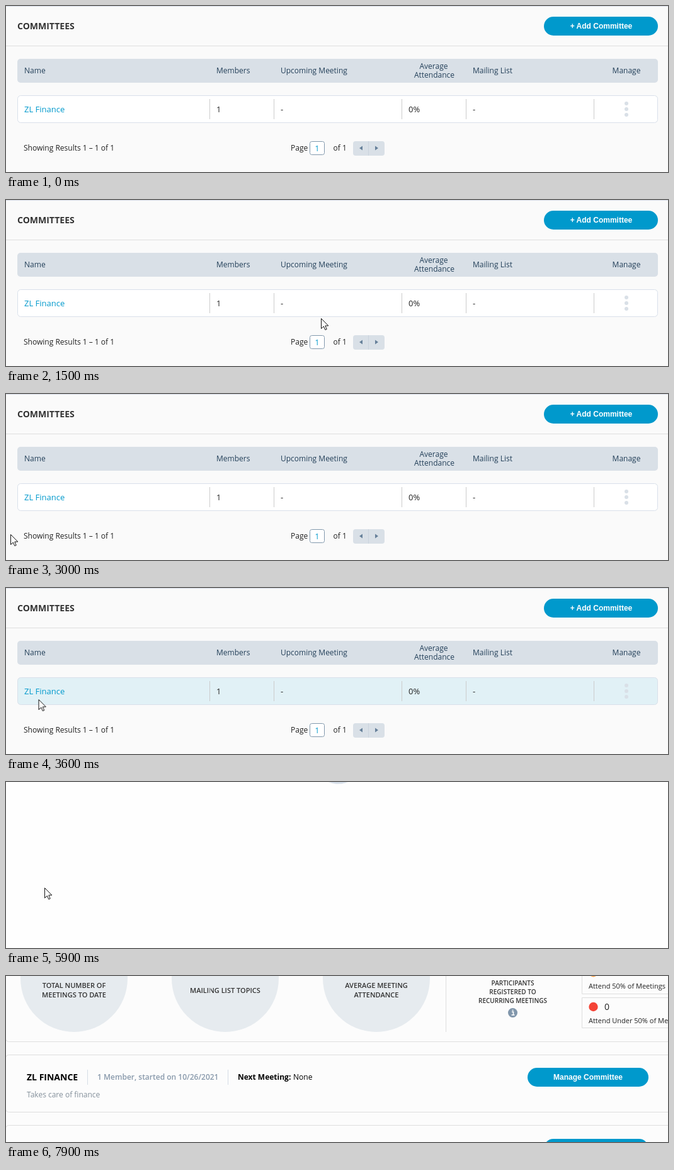
An HTML page that plays this animation: 1051 by 264 pixels, repeating every 8 s.

```html
<!DOCTYPE html>
<html lang="en">
<head>
<meta charset="utf-8">
<title>Committees</title>
<style>
html, body { margin: 0; width: 100%; height: 100%; overflow: hidden; background: #fefefe; }
svg { display: block; width: 1051px; height: 264px; font: 12px "Open Sans", sans-serif; }
.list, .detail, .wait, .row, .add, .mouse, .arrow, .beam { animation: 8s step-end infinite; }
.list { animation-name: list; }
.wait { animation-name: wait; }
.detail { animation-name: detail; }
.row { fill: #fff; stroke: #d9e0ea; animation-name: row; }
.add { animation-name: add; }
.mouse { animation-name: mouse; }
.arrow { fill: #fff; stroke: #111; animation-name: arrow; }
.beam { animation-name: beam1; }
.beam.b { animation-name: beam2; }
.spin { transform-origin: 527.5px -37px; animation: spin .8s steps(8) infinite; }

.mid { text-anchor: middle; }
.b { font-weight: 700; }
.semi { font-weight: 600; }
.head { fill: #24405a; }
.dark { fill: #222; }
.blue { fill: #0099cc; }
.bar { fill: #d9e0e7; }
.line { fill: none; stroke: #dedede; }
.btn { font: bold 12px "Liberation Sans", Arial, sans-serif; fill: #fff; text-anchor: middle; }

@keyframes list { 0% { opacity: 1 } 52.5%, 100% { opacity: 0 } }
@keyframes wait { 0% { opacity: 0 } 52.5% { opacity: 1 } 78.75%, 100% { opacity: 0 } }
@keyframes detail { 0% { opacity: 0 } 78.75%, 100% { opacity: 1 } }
@keyframes row {
  0%, 18.75%, 23.75%, 37.5%, 100% { fill: #fff }
  7.5%, 21.25%, 36.25%, 43.75% { fill: #e1f1f6 }
  33.75% { fill: #fff }
}
@keyframes add { 0%, 32.5%, 100% { fill: #0099cc } 30% { fill: #0087b4 } }
@keyframes spin { from { transform: rotate(72deg) } to { transform: rotate(432deg) } }
@keyframes arrow {
  0%, 95%, 98.75%, 100% { opacity: 0 }
  3.75%, 97.5% { opacity: 1 }
}
@keyframes beam1 { 0% { opacity: 0 } 95% { opacity: 1 } 97.5%, 100% { opacity: 0 } }
@keyframes beam2 { 0% { opacity: 0 } 98.75%, 100% { opacity: 1 } }
@keyframes mouse {
  0% { transform: translate(95px, 0) }
  3.75% { transform: translate(95px, 0); animation-timing-function: steps(3) }
  7.5% { transform: translate(75px, 160px) }
  8.75% { transform: translate(64px, 187px) }
  10% { transform: translate(60px, 179px); animation-timing-function: steps(3) }
  13.75% { transform: translate(27px, 163px) }
  16.25% { transform: translate(264px, 173px) }
  18.75% { transform: translate(500px, 188px) }
  21.25% { transform: translate(640px, 172px); animation-timing-function: steps(6) }
  28.75% { transform: translate(900px, 54px); animation-timing-function: steps(2) }
  31.25% { transform: translate(905px, 36px) }
  32.5% { transform: translate(830px, 62px) }
  33.75% { transform: translate(756px, 77px) }
  36.25% { transform: translate(300px, 160px) }
  37.5% { transform: translate(7px, 223px) }
  38.75% { transform: translate(4px, 222px); animation-timing-function: steps(6) }
  46.25% { transform: translate(61px, 168px) }
  92.5% { transform: translate(90px, 180px) }
  93.75% { transform: translate(170px, 197px) }
  97.5%, 100% { transform: translate(280px, 85px) }
}
</style>
</head>
<body>
<svg viewBox="0 0 1051 264">
  <g class="list">
    <rect width="1051" height="264" fill="#fafafa"/>
    <path d="M0 .5H1051" stroke="#d9dfea"/>
    <path class="line" d="M0 63.5H1051"/>
    <text class="b" x="18" y="37" font-size="14" fill="#333">COMMITTEES</text>
    <rect class="add" x="854" y="17" width="181" height="30" rx="15"/>
    <text class="btn" x="945" y="36">+ Add Committee</text>

    <rect class="bar" x="18" y="84" width="1017" height="38" rx="5"/>
    <g class="head">
      <text x="29" y="107">Name</text>
      <text x="334" y="107">Members</text>
      <text x="436" y="107">Upcoming Meeting</text>
      <text class="mid" x="679" y="100">Average</text>
      <text class="mid" x="680" y="114">Attendance</text>
      <text x="741" y="107">Mailing List</text>
      <text class="mid" x="985" y="107">Manage</text>
    </g>

    <rect class="row" x="18.5" y="142.5" width="1016" height="43" rx="5"/>
    <path d="M323.5 148v32m102-32v32m203-32v32m102-32v32m203-32v32" stroke="#ccc"/>
    <g class="dark" font-size="13">
      <text class="blue" x="29" y="169">ZL Finance</text>
      <text x="334" y="169">1</text>
      <text x="436" y="169">-</text>
      <text x="639" y="169">0%</text>
      <text x="741" y="169">-</text>
    </g>
    <g class="bar">
      <circle cx="985" cy="155" r="3"/>
      <circle cx="985" cy="164" r="3"/>
      <circle cx="985" cy="173" r="3"/>
    </g>

    <g class="dark">
      <text x="28" y="230">Showing Results 1 – 1 of 1</text>
      <text x="452" y="230">Page</text>
      <text x="519.5" y="230">of 1</text>
    </g>
    <rect x="482.5" y="215.5" width="23" height="21" rx="3" fill="#fff" stroke="#8299ad"/>
    <text class="mid blue" x="494" y="231">1</text>
    <rect class="bar" x="551" y="215" width="50" height="23" rx="4"/>
    <path d="M575.5 215v23" stroke="#cbd4dd"/>
    <path d="M566 222.500v7l-5-3.500zM586 222.500v7l5-3.500z" fill="#66809a"/>
  </g>

  <g class="wait">
    <rect width="1051" height="264" fill="#fefefe"/>
    <circle class="spin" cx="527.5" cy="-37" r="36" fill="none" stroke="#d5dee9"
            stroke-width="8" pathLength="360" stroke-dasharray="270 90"/>
  </g>

  <g class="detail">
    <rect width="1051" height="264" fill="#fcfcfc"/>
    <g fill="#e6ebef">
      <circle cx="108" cy="4" r="85"/>
      <circle cx="348" cy="4" r="85"/>
      <circle cx="588" cy="4" r="85"/>
    </g>
    <g class="mid semi" font-size="11" fill="#333">
      <text x="108" y="19">TOTAL NUMBER OF</text>
      <text x="108" y="34">MEETINGS TO DATE</text>
      <text x="348" y="27">MAILING LIST TOPICS</text>
      <text x="588" y="19">AVERAGE MEETING</text>
      <text x="588" y="34">ATTENDANCE</text>
    </g>
    <g class="mid semi" font-size="10" fill="#333">
      <text x="804.5" y="15">PARTICIPANTS</text>
      <text x="804.5" y="29">REGISTERED TO</text>
      <text x="804.5" y="43">RECURRING MEETINGS</text>
    </g>
    <circle cx="804.5" cy="58.500" r="7.500" fill="#8096ab"/>
    <path d="M803 57h2.500v5m-3 0h5M803.500 54.500h2" fill="none" stroke="#fff" stroke-width="1.600"/>

    <g class="line">
      <path d="M698.5 0V89M914.5 0V28.500H1051M1051 34.500H914.5V82.500H1051"/>
      <rect x="-.5" y="-20" width="1060" height="124.500" rx="5"/>
      <rect x="-.5" y="125.500" width="1060" height="91" rx="5"/>
      <rect x="-.5" y="237.500" width="1060" height="91" rx="5"/>
    </g>
    <circle cx="932.5" cy="-5.500" r="7" fill="#ffa040"/>
    <circle cx="932.5" cy="49" r="7.200" fill="#f44336"/>
    <g class="dark" font-size="11">
      <text x="925" y="20">Attend 50% of Meetings</text>
      <text x="950" y="54" font-size="14">0</text>
      <text x="925" y="75">Attend Under 50% of Meetings</text>
    </g>

    <text class="b" x="33" y="166" font-size="14">ZL FINANCE</text>
    <path d="M129.5 149v24m223-24v24" stroke="#d5dde6"/>
    <text class="semi" x="145" y="165" fill="#8899ab">1 Member, started on 10/26/2021</text>
    <text class="b" x="368" y="165">Next Meeting:</text>
    <text x="456" y="165">None</text>
    <text x="33" y="193" fill="#84909b">Takes care of finance</text>
    <rect class="blue" x="828" y="146" width="192" height="30" rx="15"/>
    <text class="btn" x="924" y="165">Manage Committee</text>
    <rect class="blue" x="854" y="259" width="166" height="30" rx="15"/>
    <rect class="beam" x="243" y="157" width="1" height="9" fill="#fcfcfc"/>
    <rect class="beam b" x="324" y="19" width="1" height="9" fill="#e6ebef"/>
  </g>

  <g class="mouse">
    <path class="arrow" d="M.5.5V16.500L4.300 13 6.800 18.500 9.200 17.500 6.800 12H11.800Z"/>
  </g>
</svg>
</body>
</html>
```
